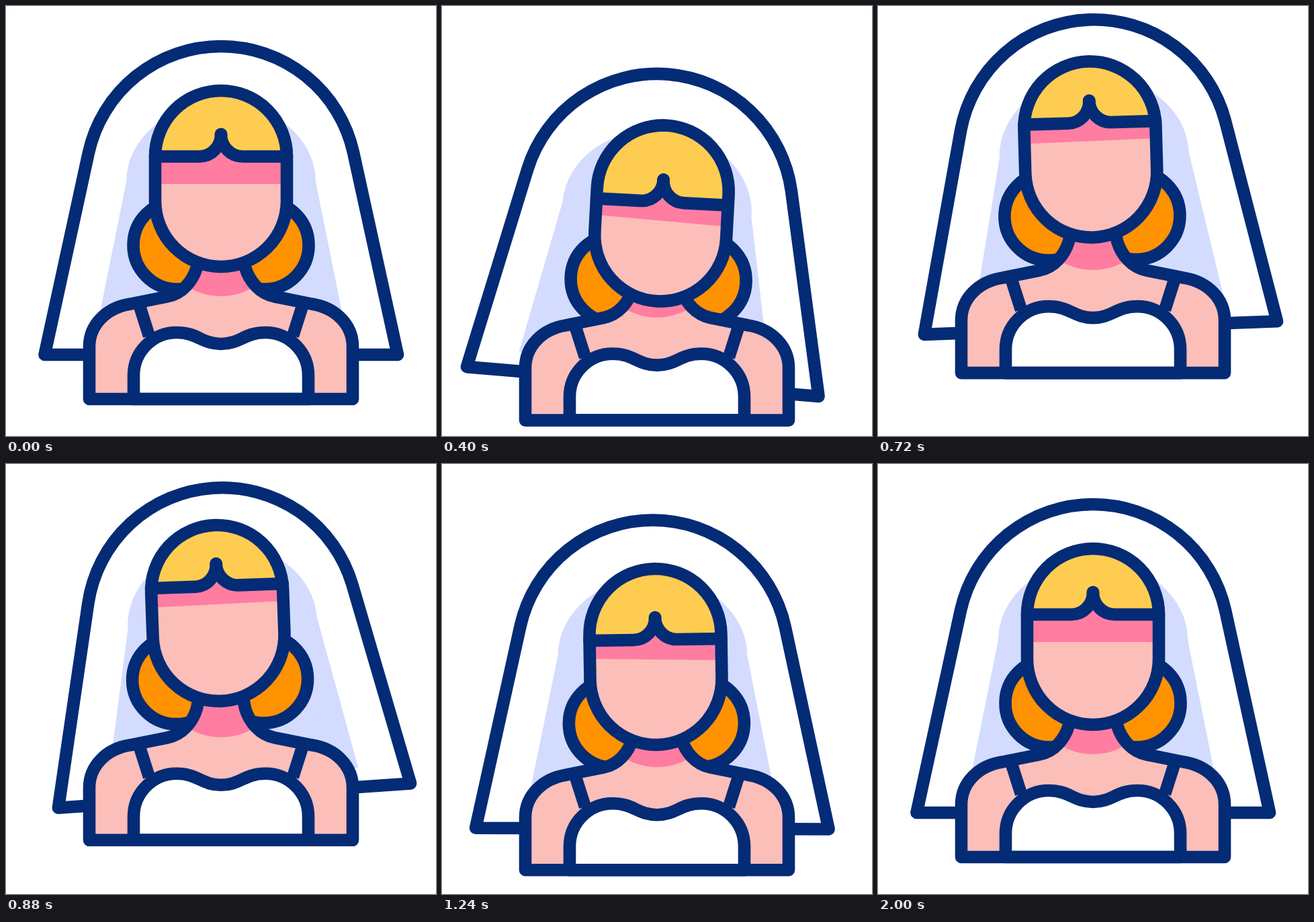
An HTML page with a canvas for the animation above (2200 ms loop, 640 px wide and 640 px high).

```html
<!DOCTYPE html>
<html lang="en">
<head>
<meta charset="utf-8">
<title>Bride</title>
<style>
  html, body { margin: 0; width: 100%; height: 100%; overflow: hidden; background: #fff; }
  canvas { display: block; width: 640px; height: 640px; }
</style>
</head>
<body>
<canvas id="stage" width="640" height="640"></canvas>
<script>
const ctx = document.getElementById('stage').getContext('2d');
const LOOP = 2200, STEP = 40, REST = 2000;
const NAVY = '#042b75', SKIN = '#fcbeb9', PINK = '#ff7da1',
      GOLD = '#fecc51', ORANGE = '#ff9200', LILAC = '#d3dcfe', WHITE = '#fff';

// Each track is a list of [time, value], eased between neighbours.
const tracks = {
  bodyY:      [[0, 0], [367, 33], [750, -40], [1150, 22], [1540, 0]],
  veilY:      [[0, 0], [367, 42.5], [750, -41], [1150, 27], [1540, 0]],
  veilX:      [[0, 0], [400, 0], [860, 2], [1240, -6.5], [1620, 3.5], [2000, 0]],
  veilTurn:   [[0, 0], [400, 4.8], [860, -4], [1240, 0.2], [1620, -0.9], [2000, 0]],
  headY:      [[0, 0], [367, 53], [775, -48], [1175, 32], [1575, 0]],
  headTurn:   [[0, 0], [400, 3.05], [800, -2.1], [1600, 0]],
  fringeY:    [[0, 0], [400, 16], [800, -9], [1200, 7.7], [1600, 0]],
  shadeY:     [[0, 0], [400, 3], [800, -23], [1200, -4], [1600, 0]],
  shadeTurn:  [[0, 0], [400, 5.2], [800, -3.3], [1200, 0.6], [1600, 0]]
};

function at(name, t) {
  const keys = tracks[name];
  for (let i = 1; i < keys.length; i++) {
    const [t0, a] = keys[i - 1], [t1, b] = keys[i];
    if (t < t1) return a + (b - a) * (1 - Math.cos(Math.PI * (t - t0) / (t1 - t0))) / 2;
  }
  return keys[keys.length - 1][1];
}

function turn(deg, x, y) {
  ctx.translate(x, y);
  ctx.rotate(deg * Math.PI / 180);
  ctx.translate(-x, -y);
}

function group(draw) {
  ctx.save();
  draw();
  ctx.restore();
}

function fill(path, color) {
  ctx.fillStyle = color;
  ctx.fill(path);
}

function line(path) {
  ctx.stroke(path);
}

const veil = new Path2D('M57.5 519 L123 218 A201.8 201.8 0 0 1 517 218 L583 519 Z');
const veilShade = new Path2D('M133 490 L179 262 A141 118 0 0 1 461 262 L507 490 Z');

const body = new Path2D(
  'M124 585 V507 C124 475 149 449 185 443.5 L240 432.5 C263 428 278 409 284 389 L290 360 ' +
  'H350 L356 389 C362 409 377 428 400 432.5 L455 443.5 C491 449 516 475 516 507 V585 Z');
const dress = new Path2D(
  'M190 585 V550 A64 64 0 0 1 254 486 C285 486 292 503 320 503 ' +
  'C348 503 355 486 386 486 A64 64 0 0 1 450 550 V585 Z');
const straps = new Path2D('M199 447 L213 491 M441 447 L427 491');
const neckShade = new Path2D();
neckShade.arc(320, 339, 93, 0, Math.PI * 2);

const head = new Path2D('M222 224 A98 98 0 0 1 418 224 V290 A98 98 0 0 1 222 290 Z');
const parting = 'M222 224 H288 A32 33 0 0 0 320 191 A32 33 0 0 0 352 224 H418';
const fringe = new Path2D(parting);
const hair = new Path2D(parting + ' H440 V60 H200 V224 Z');
const shade = new Path2D('M160 100 H480 V265 H160 Z');

const buns = [255, 385].map(x => {
  const p = new Path2D();
  p.arc(x, 356, 65.5, 0, Math.PI * 2);
  return p;
});

function drawVeil(t) {
  ctx.translate(at('veilX', t), at('veilY', t));
  turn(at('veilTurn', t), 320, 262);
  fill(veil, WHITE);
  fill(veilShade, LILAC);
  line(veil);
}

function drawBuns(t) {
  ctx.translate(0, at('headY', t));
  turn(at('headTurn', t) * 0.35, 320, 470);
  for (const bun of buns) {
    fill(bun, ORANGE);
    line(bun);
  }
}

function drawBody(t) {
  ctx.translate(0, at('bodyY', t));
  fill(body, SKIN);
  group(() => {
    ctx.clip(body);
    fill(neckShade, PINK);
  });
  ctx.lineCap = 'butt';
  line(straps);
  fill(dress, WHITE);
  line(dress);
  line(body);
}

function drawHead(t) {
  const tilt = at('headTurn', t), drop = at('fringeY', t);
  ctx.translate(0, at('headY', t));
  turn(tilt, 320, 388);
  fill(head, SKIN);
  group(() => {
    ctx.clip(head);
    group(() => {
      ctx.translate(0, at('shadeY', t));
      turn(at('shadeTurn', t) - tilt, 320, 265);
      fill(shade, PINK);
    });
    ctx.translate(0, drop);
    fill(hair, GOLD);
  });
  group(() => {
    ctx.translate(0, drop);
    line(fringe);
    ctx.fillStyle = NAVY;
    ctx.beginPath();
    ctx.arc(320, 191, 9.5, 0, Math.PI * 2);
    ctx.fill();
  });
  line(head);
}

function render(t) {
  ctx.fillStyle = WHITE;
  ctx.fillRect(0, 0, 640, 640);
  ctx.strokeStyle = NAVY;
  ctx.lineWidth = 18.6;
  ctx.lineJoin = ctx.lineCap = 'round';
  for (const part of [drawVeil, drawBuns, drawBody, drawHead]) group(() => part(t));
}

let start;
function tick(now) {
  if (start === undefined) start = now;
  const t = (now - start) % LOOP;
  render(Math.min(REST, Math.floor(t / STEP) * STEP));
  requestAnimationFrame(tick);
}
render(0);
requestAnimationFrame(tick);
</script>
</body>
</html>
```
